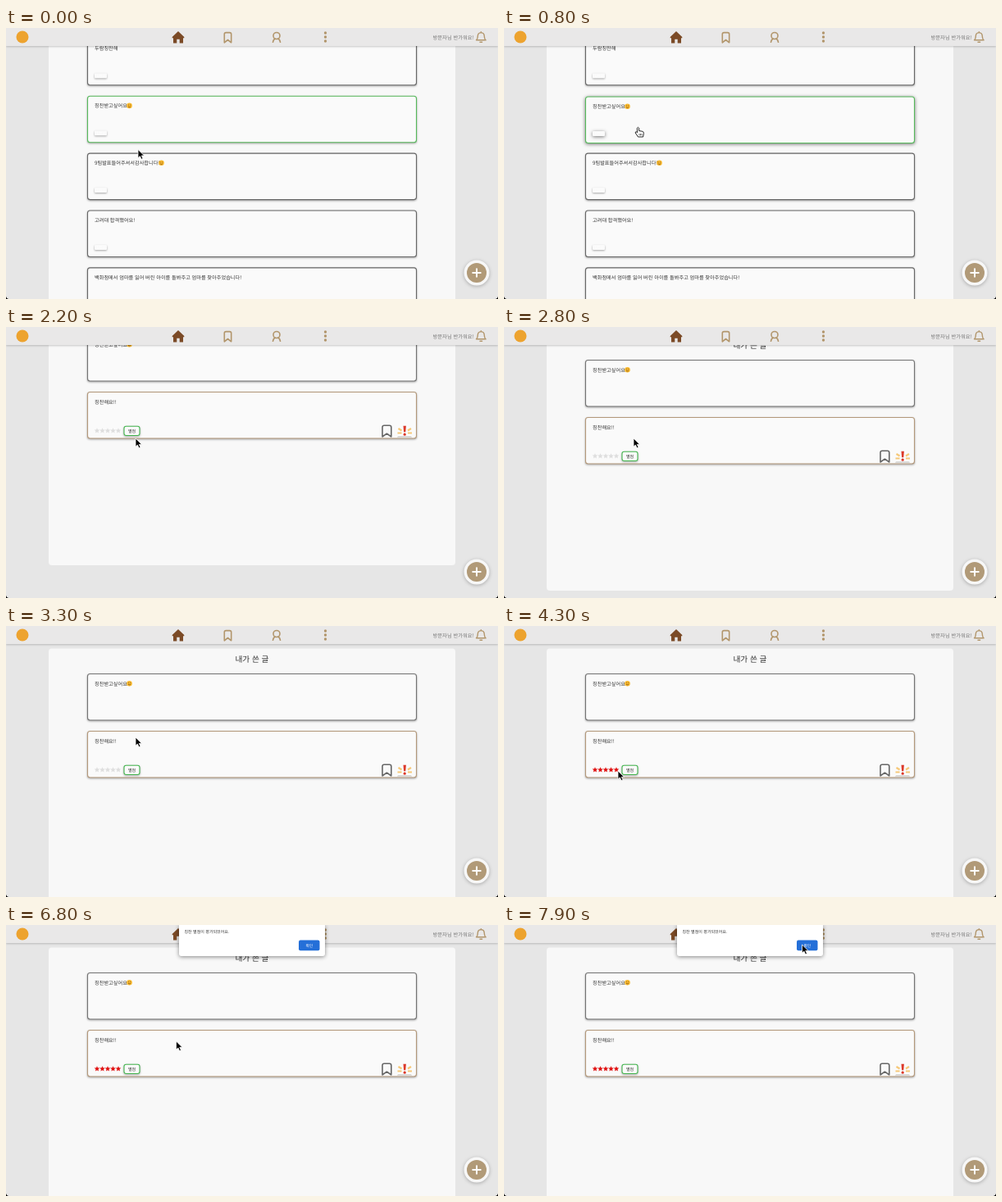
Animation of 600 by 331 pixels, one loop 8000 ms. Source, as an HTML page:

```html
<!DOCTYPE html>
<html lang="ko">
<head>
<meta charset="utf-8">
<style>
html, body { margin: 0; width: 100%; height: 100%; overflow: hidden; background: #e6e6e6 }
svg { display: block; width: 600px; height: 331px }
text { font-family: "Noto Sans CJK KR", "Noto Sans CJK", "Noto Sans", sans-serif; font-size: 6.2px; fill: #333; text-rendering: geometricPrecision }
.card > rect { fill: #fafafa; stroke-width: 1.1; filter: drop-shadow(0 1px 1px #0005) }
.hover > rect { filter: drop-shadow(0 1px 2px #0008) }
.line { fill: none; stroke: #b2966c; stroke-width: 1.6; stroke-linejoin: round; stroke-linecap: round }
</style>
</head>
<body>
<svg viewBox="0 0 600 331">
  <g id="feed"></g>
  <g id="mine"></g>
  <g id="header">
    <rect width="600" height="22" fill="#e9e8e8" style="filter:drop-shadow(0 1px 1px #0003)"/>
    <circle cx="20" cy="11" r="7.5" fill="#eda32f"/>
    <path d="M202.7 11 210 4l7.3 7v1.200h-1.300V18.500h-4.300v-4.800h-3.400v4.800H204v-6.300h-1.300z" fill="#7b4a26"/>
    <path class="line" d="M266.300 17.800V7.500q0-1.900 1.900-1.900h4.600q1.900 0 1.900 1.900V17.800l-4.200-3.300z"/>
    <circle class="line" cx="330" cy="9.500" r="4"/>
    <path class="line" d="M325.500 17.300q.6-3.800 3-4m3 0q2.400.2 3 4"/>
    <g fill="#b2966c"><circle cx="389.500" cy="6" r="1.700"/><circle cx="389.500" cy="11" r="1.700"/><circle cx="389.500" cy="16" r="1.700"/></g>
    <text x="520.500" y="13.800" style="font-size:6.300px;fill:#777">방문자님 반가워요!</text>
    <path class="line" d="M573.500 14.800q1.800-1.500 1.800-4.800 0-4 4-4.400 4 .4 4 4.400 0 3.300 1.800 4.800zM578 17.300h2.600M579.300 5.400V4.700" style="stroke-width:1.400"/>
  </g>
  <g>
    <circle cx="574" cy="299" r="15.500" fill="#f7f7f7" style="filter:drop-shadow(0 1px 2px #0004)"/>
    <circle cx="574" cy="299" r="12" fill="#b19a78"/>
    <path d="M568.500 299h11M574 293.500v11" stroke="#fff" stroke-width="2"/>
  </g>
  <g id="alert">
    <path d="M211 0h178v35q0 3-3 3H214q-3 0-3-3z" fill="#fff" style="filter:drop-shadow(0 1px 2.500px #0007)"/>
    <text x="217.500" y="10.200" style="font-size:5px">칭찬 별점이 평가되었어요.</text>
    <rect x="357" y="18.500" width="25.500" height="12.800" rx="2" fill="#246fd8"/>
    <text x="369.800" y="26.700" text-anchor="middle" style="font-size:4.800px;fill:#fff">확인</text>
  </g>
  <path d="M0 328v3h3q-2.500-.5-3-3zM600 328v3h-3q2.500-.5 3-3z"/>
  <g id="cursor">
    <path id="arrow" d="M0 0v10.200l2.400-2.100 1.700 3.700 1.900-.9-1.700-3.500h3.300z" stroke="#fff" stroke-width=".8"/>
    <g id="hand" fill="#fff" stroke="#111" stroke-width=".9" stroke-linejoin="round">
      <path d="M-1.200 1.200q1.200-1.800 2.300 0v3.300l4.200.8q1.700.5 1.600 2.200l-.8 4.500H0L-3.300 7q-.3-1.700 1.500-1l.8.800z"/>
      <path d="M1.500 8v2.300M3 8v2.300M4.500 8v2.300" stroke-width=".6"/>
    </g>
  </g>
</svg>
<script>
const $ = id => document.getElementById(id);

const label = (x, y, s) => `<text x="${x}" y="${y}">${s}</text>`;
const smiley = (x, y) => `<g transform="translate(${x} ${y})"><circle r="3.300" fill="#f8b92c"/>
  <path d="M-1.700-.8h1M.7-.8h1M-1.500 1Q0 2.500 1.500 1" fill="none" stroke="#70401a" stroke-width=".7"/></g>`;
const badge = y => `<rect x="108" y="${y}" width="15" height="6" rx="1" fill="#a98b6d"/>
  <text x="115.500" y="${y + 4.4}" text-anchor="middle" style="font-size:3.900px;fill:#fff">칭찬 1</text>`;

function card(top, color, text, emojiX, extra = '', id = '') {
  return `<g class="card" id="${id}"><rect x="99.500" y="${top}" width="401" height="56.500" rx="3" stroke="${color}"/>
    ${label(108, top + 14, text)}${emojiX ? smiley(emojiX, top + 11.700) : ''}${extra}</g>`;
}

function star(x, y) {
  const points = Array.from({length: 10}, (_, i) => {
    const r = i % 2 ? 1.6 : 3.5, a = i * Math.PI / 5;
    return [x + r * Math.sin(a), y - r * Math.cos(a)].map(v => v.toFixed(2));
  });
  return `<polygon points="${points.join(' ')}"/>`;
}

const posts = [
  ['두람칭찬해'],
  ['칭찬받고싶어요', 150.5],
  ['9팀발표들어주셔서감사합니다!', 189.5],
  ['고려대 합격했어요!'],
  ['백화점에서 엄마를 잃어 버린 아이를 돌봐주고 엄마를 찾아주었습니다!']
];
$('feed').innerHTML = '<rect x="52" width="496" height="331" fill="#f8f8f8"/>' + posts.map(([text, emojiX], i) => {
  const top = 13.3 + 69.9 * i;
  return card(top, i === 1 ? '#55b85a' : '#666', text, emojiX, badge(top + 42), 'post' + i);
}).join('');

const rating = `<g id="stars">${[0, 1, 2, 3, 4].map(i => star(111 + i * 6.5, 175.7)).join('')}</g>
  <rect x="144" y="170.300" width="19" height="11.200" rx="2.500" fill="#fff" stroke="#45b750" stroke-width="1.300"/>
  <text x="153.500" y="177.700" text-anchor="middle" style="font-size:5px;font-weight:500">별점</text>
  <path class="line" d="M459 183V171.500q0-2.200 2.200-2.200h6.400q2.200 0 2.200 2.200V183l-5.400-3.800z" style="stroke:#666"/>
  <path d="M477 182.500q1-2.500 4-2.500h10q3 0 4 2.500z" fill="#fff" style="filter:drop-shadow(0 1px .6px #0004)"/>
  <path d="M478.500 173l4 2.500M494 173l-4 2.500M477.500 178.500h5M490 178.500h5" stroke="#f6c878" stroke-width="2.200"/>
  <path d="M484.500 169.800h3.400l-.6 7.500h-2.200z" fill="#dc3a2b"/><circle cx="486.200" cy="180.200" r="1.600" fill="#dc3a2b"/>`;
$('mine').innerHTML = `<rect x="52" y="27.500" width="496" height="312.500" rx="4" fill="#f8f8f8"/>
  <text x="300" y="43.700" text-anchor="middle" style="font-size:9.700px">내가 쓴 글</text>
  ${card(58.5, '#737373', '칭찬받고싶어요', 150.5)}${card(128.5, '#b3987a', '칭찬해요!!', 0, rating)}`;

const LOOP = 8000, OPEN_POST = 1100, RATED = 3800, ALERT = 6400;
const scrollKeys = [[0, 49], [2500, 49], [2800, 18], [3000, 0]];
const cursorKeys = [
  [0, 161, 148.5], [100, 161, 148.5], [600, 163.5, 121], [1200, 163.5, 121], [1800, 158, 136],
  [3300, 158, 136], [3900, 139, 177], [4700, 139, 177], [5000, 141, 180], [5300, 150, 187],
  [5700, 164.5, 174.5], [6500, 164.5, 174.5], [7500, 363.5, 24]
];

function sample(keys, t, ease = k => k) {
  const next = keys.findIndex(key => key[0] > t);
  if (next < 0) return keys.at(-1).slice(1);
  const a = keys[next - 1], b = keys[next];
  const k = ease((t - a[0]) / (b[0] - a[0]));
  return a.slice(1).map((v, i) => v + (b[i + 1] - v) * k);
}
const smooth = k => k * k * (3 - 2 * k);
const show = (id, on) => $(id).setAttribute('visibility', on ? 'visible' : 'hidden');

function draw(now) {
  const t = Math.floor(now % LOOP / 100) * 100;
  const [x, y] = sample(cursorKeys, t, smooth);
  const onFeed = t < OPEN_POST, hover = onFeed && y < 140;
  const hand = hover || (t >= 5600 && t < ALERT + 100);

  show('feed', onFeed);
  show('mine', !onFeed);
  show('alert', t >= ALERT);
  show('hand', hand);
  show('arrow', !hand);
  $('post1').setAttribute('class', hover ? 'card hover' : 'card');
  $('post1').setAttribute('transform', `translate(0 ${hover ? 0.8 : 0})`);
  $('mine').setAttribute('transform', `translate(0 ${-sample(scrollKeys, t)[0]})`);
  $('stars').setAttribute('fill', t < RATED ? '#dedede' : '#e01010');
  $('cursor').setAttribute('transform', `translate(${x} ${y})`);
  requestAnimationFrame(draw);
}
requestAnimationFrame(draw);
</script>
</body>
</html>
```
